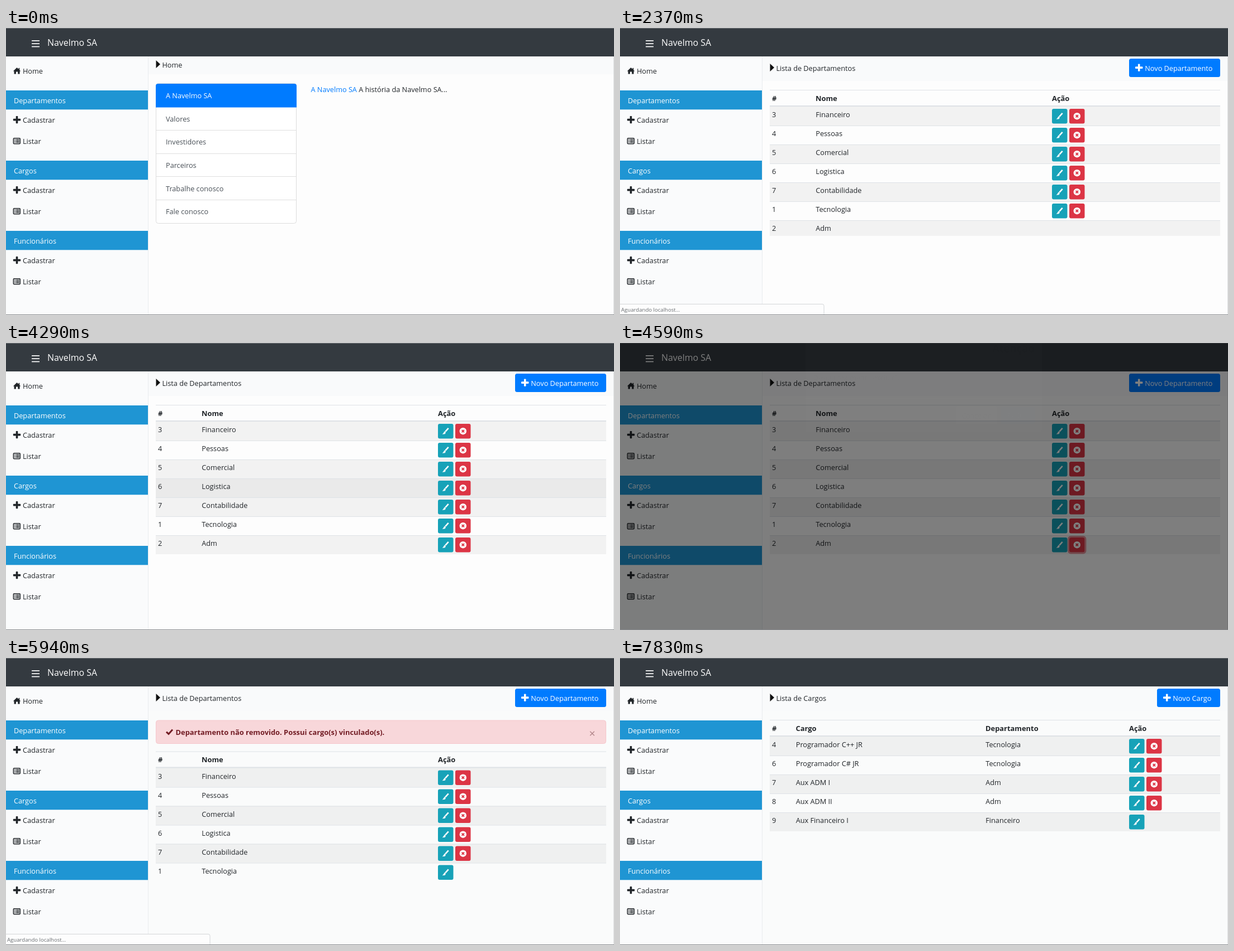
Recreate the animation shown at these times as an HTML page with a canvas. Size 1088 px wide and 515 px high, loop 8000 ms.

```html
<!DOCTYPE html>
<html lang="pt-BR">
<head>
<meta charset="utf-8">
<title>Navelmo SA</title>
<style>
  html, body { margin: 0; width: 100%; height: 100%; overflow: hidden; background: #fdfdfd; }
  canvas { display: block; width: 1088px; height: 515px; }
</style>
</head>
<body>
<canvas id="stage" width="1088" height="515"></canvas>
<script>
const ctx = document.getElementById('stage').getContext('2d');
const LOOP = 8000;
const SANS = '"Open Sans", "Noto Sans", sans-serif';
const INK = '#212529', BLUE = '#007bff', TEAL = '#17a2b8', RED = '#dc3545';
const LINE = '#dee2e6', HOVER = '#0056b3';

const TABS = [
  ['A Navelmo SA', 'A história da Navelmo SA...'],
  ['Valores', 'Nossos valores...'],
  ['Investidores', 'Informações para os investidores...'],
  ['Parceiros', 'Principais parceiros...'],
  ['Trabalhe conosco', 'Veja nossas vagas e envie o currículo...'],
  ['Fale conosco', 'Entre em contato...']
];
const DEPTS = [[3, 'Financeiro'], [4, 'Pessoas'], [5, 'Comercial'], [6, 'Logistica'],
  [7, 'Contabilidade'], [1, 'Tecnologia'], [2, 'Adm']];
const JOBS = [[4, 'Programador C++ JR', 'Tecnologia'], [6, 'Programador C# JR', 'Tecnologia'],
  [7, 'Aux ADM I', 'Adm'], [8, 'Aux ADM II', 'Adm'], [9, 'Aux Financeiro I', 'Financeiro']];

// Timelines: [start, value], the last one started is in force.
const HOST = 'localhost:8080/', WAIT = 'Aguardando localhost...';
const STATUS = [[0, ''], [270, HOST + '#valores'], [510, HOST + '#investidores'],
  [720, HOST + '#parceiros'], [960, HOST + '#hibernate'], [1350, HOST + 'departamentos/listar'],
  [1830, WAIT], [2925, ''], [5040, HOST + 'departamentos/excluir/2'], [5280, WAIT],
  [6780, HOST + 'cargos/listar'], [7020, WAIT], [7815, '']];
const TAB = [[0, 0], [420, 1], [630, 2], [840, 3], [1110, 4]];
const TAB_HOVER = [[0, -1], [270, 1], [510, 2], [720, 3], [960, 4], [1260, -1]];
const TAB_PRESS = [[0, -1], [360, 1], [420, -1], [570, 2], [630, -1], [780, 3], [840, -1], [1020, 4], [1110, -1]];
const SIDE_HOVER = [[0, ''], [1350, '0L'], [1500, '0C'], [1530, '0L'], [2370, ''], [2670, '0L'],
  [2730, '0C'], [3510, ''], [6540, '1C'], [6690, '1L'], [7740, '']];
const ROW_HOVER = [[0, -1], [3510, 3], [4320, 5], [4350, 6], [4440, -1], [6480, 0], [6540, -1]];

const entry = (list, t) => list.filter(e => e[0] <= t).pop();
const at = (list, t) => entry(list, t)[1];
const ramp = (t, start, len) => Math.min(1, Math.max(0, (t - start) / len));

function easeOut(x) {
  // cubic-bezier(0, 0, .58, 1)
  let lo = 0, hi = 1;
  for (let i = 0; i < 20; i++) {
    const s = (lo + hi) / 2;
    if (3 * .58 * (1 - s) * s * s + s * s * s < x) lo = s; else hi = s;
  }
  return lo * lo * (3 - 2 * lo);
}

function rect(x, y, w, h, color) {
  ctx.fillStyle = color;
  ctx.fillRect(x, y, w, h);
}
function box(x, y, w, h, r, fill, stroke, lw = 1) {
  ctx.beginPath();
  ctx.roundRect(x, y, w, h, r);
  if (fill) { ctx.fillStyle = fill; ctx.fill(); }
  if (stroke) { ctx.strokeStyle = stroke; ctx.lineWidth = lw; ctx.stroke(); }
}
function text(s, x, y, color = INK, size = 12.7, weight = 400) {
  ctx.font = `${weight} ${size}px ${SANS}`;
  ctx.fillStyle = color;
  ctx.fillText(s, x, y);
  return ctx.measureText(s).width;
}
function poly(points, color) {
  ctx.beginPath();
  for (let i = 0; i < points.length; i += 2) ctx.lineTo(points[i], points[i + 1]);
  ctx.closePath();
  ctx.fillStyle = color;
  ctx.fill();
}
function stroke(points, color, lw) {
  ctx.beginPath();
  for (let i = 0; i < points.length; i += 2) ctx.lineTo(points[i], points[i + 1]);
  ctx.strokeStyle = color;
  ctx.lineWidth = lw;
  ctx.stroke();
}
function cross(x, y, r, color, lw) {
  stroke([x - r, y - r, x + r, y + r], color, lw);
  stroke([x + r, y - r, x - r, y + r], color, lw);
}
function plus(x, y, color) {
  box(x, y + 4.8, 13.4, 3.6, 1, color);
  box(x + 4.9, y, 3.6, 13.2, 1, color);
}
function listIcon(x, y, color) {
  box(x + .8, y + .8, 11.8, 10, 1.2, null, color, 1.6);
  for (const dy of [2.6, 5, 7.4]) {
    rect(x + 2.8, y + dy, 1.7, 1.5, color);
    rect(x + 5.4, y + dy, 5.6, 1.5, color);
  }
}
function home() {
  poly([12.8, 77.4, 19.5, 71, 22.6, 73.8, 22.6, 71.8, 24.3, 71.8, 24.3, 75.4, 26.3, 77.4, 24.6, 77.6,
    24.6, 82.6, 21.2, 82.6, 21.2, 78.6, 17.9, 78.6, 17.9, 82.6, 14.5, 82.6, 14.5, 77.6], INK);
}

function sidebar(t) {
  rect(0, 51, 254, 464, '#fafbfc');
  rect(254, 51, 1, 464, '#e9ecef');
  home();
  text('Home', 30, 81.5);
  const hover = at(SIDE_HOVER, t);
  ['Departamentos', 'Cargos', 'Funcionários'].forEach((name, i) => {
    const y = 112 + 126 * i;
    rect(0, y, 254, 34.3, '#1f95d3');
    text(name, 14, y + 22.5, '#fff');
    const add = hover === i + 'C' ? HOVER : INK;
    const list = hover === i + 'L' ? HOVER : INK;
    plus(12.8, y + 46, add);
    text('Cadastrar', 30, y + 58, add);
    listIcon(12.6, y + 85, list);
    text('Listar', 30, y + 95.5, list);
  });
}

function header() {
  rect(0, 0, 1088, 51, '#343a40');
  rect(0, 0, 1088, 1, '#6b7075');
  for (const y of [22, 27.3, 32.6]) rect(46, y, 14, 1.7, '#fff');
  text('Navelmo SA', 74, 31.5, '#fff', 15.9);
}

function crumb(title, height, mid) {
  rect(255, 51, 833, height, '#f9fafb');
  poly([268.5, mid - 8, 276, mid - 1, 268.5, mid + 6], '#111');
  text(title, 279.5, mid + 4.5);
}

function homePage(t) {
  crumb('Home', 32, 66);
  const [since, active] = entry(TAB, t);
  const hover = at(TAB_HOVER, t), press = at(TAB_PRESS, t), pitch = 41.67;
  box(268.5, 100, 251, 250.5, 4, '#fff');
  TABS.forEach(([name], i) => {
    const y = 100 + pitch * i, on = i === active;
    const fill = i === press ? '#e9ecef' : i === hover || (i === 0 && t >= 270) ? '#f8f9fa' : '';
    if (fill) rect(268.5, y, 251, pitch, fill);
    if (i && !on) rect(268, Math.round(y - .4), 252, 1, '#dfdfdf');
    if (!on) text(name, 286, y + 26, i === press ? INK : '#495057');
  });
  box(268.5, 99.5, 251, 251, 4, null, '#dcdcdc');
  const top = Math.round(99.6 + pitch * active);
  box(268, top, 252, 42.5, active ? 0 : [4, 4, 0, 0], BLUE);
  text(TABS[active][0], 286, 126 + pitch * active, '#fff');

  ctx.globalAlpha = active ? ramp(t, since - 20, 150) : 1;
  const w = text(TABS[active][0] + ' ', 545.5, 115, BLUE);
  text(TABS[active][1], 545.5 + w, 115);
  ctx.globalAlpha = 1;
}

function newButton(x, label) {
  box(x, 55, 1074 - x, 33, 3.5, BLUE);
  plus(x + 11, 64.5, '#fff');
  text(label, x + 28.3, 76.5, '#fff');
}
function editButton(x, y, color = TEAL) {
  box(x, y, 27.5, 26.5, 3, color);
  stroke([x + 18.7, y + 7.8, x + 13.2, y + 14], '#fff', 2.6);
  poly([x + 11.8, y + 13.2, x + 14, y + 15.4, x + 12.6, y + 18.2, x + 7.6, y + 18.8, x + 9.4, y + 17], '#fff');
}
function deleteButton(x, y, focus, color = RED) {
  if (focus) box(x - 1.4, y - 1.4, 30.3, 29.3, 4, null, 'rgba(220,53,69,.5)', 3);
  box(x, y, 27.5, 26.5, 3, color);
  ctx.beginPath();
  ctx.arc(x + 13.8, y + 13.2, 6.2, 0, 7);
  ctx.fillStyle = '#fff';
  ctx.fill();
  cross(x + 13.8, y + 13.2, 2.2, color, 1.8);
}

// Columns hold the x of each heading; the last one is the action column.
function table(y, cols, heads, rows, opt) {
  rect(268, y, 806, 1, LINE);
  heads.forEach((h, i) => text(h, cols[i], y + 19.7, INK, 12.9, 700));
  rect(268, y + 28, 806, 2, LINE);
  const ax = cols[cols.length - 1];
  rows.forEach((row, i) => {
    const ry = y + 30 + 34 * i;
    const last = i === rows.length - 1;
    const parts = last ? opt.lastParts : 2;
    const h = parts ? 34 : 28;
    if (i % 2 === 0) rect(268, ry, 806, h, 'rgba(0,0,0,.045)');
    if (i === opt.hover) rect(268, ry, 806, h, 'rgba(0,0,0,.075)');
    if (i) rect(268, ry, 806, 1, LINE);
    row.forEach((s, c) => text(String(s), cols[c] + (c ? .3 : 0), ry + 19));
    if (parts > 0) editButton(ax, ry + 4);
    if (parts > 1) deleteButton(ax + 31, ry + 4, i === opt.focus, i === opt.dark ? '#c82333' : RED);
  });
}

function alertBox() {
  box(268.5, 112, 805, 41.5, 4, '#f8d7da', '#f5c6cb');
  stroke([287, 132.6, 291, 136.4, 298, 128.6], '#721c24', 3);
  text('Departamento não removido. Possui cargo(s) vinculado(s).', 303.5, 137.8, '#721c24', 12.9, 700);
  cross(1049, 135.5, 3.8, '#b58a8e', 1.6);
}

function deptPage(t) {
  crumb('Lista de Departamentos', 44, 72);
  newButton(911, 'Novo Departamento');
  const removed = t >= 5940;
  if (removed) alertBox();
  const early = removed ? t < 5970 : t < 2460;
  const rows = removed && early ? DEPTS.slice(0, 6) : DEPTS;
  table(removed ? 167.5 : 111, [272, 350, 773], ['#', 'Nome', 'Ação'], rows, {
    hover: at(ROW_HOVER, t),
    focus: !removed && t >= 4410 ? 6 : -1,
    dark: t >= 3660 && t < 3810 ? 3 : t >= 4380 && t < 4440 ? 6 : -1,
    lastParts: early ? (removed ? 1 : 0) : 2
  });
}

function jobPage() {
  crumb('Lista de Cargos', 44, 72);
  newButton(961, 'Novo Cargo');
  table(111, [272, 314.5, 654, 911], ['#', 'Cargo', 'Departamento', 'Ação'], JOBS, { lastParts: 1 });
}

function modal(t) {
  rect(0, 0, 1088, 515, `rgba(0,0,0,${.5 * ramp(t, 4440, 150)})`);
  if (t < 4590) return;
  const y = -21 + 45 * easeOut(ramp(t, 4590, 300));
  ctx.globalAlpha = ramp(t, 4590, 123);
  box(332, y, 423, 180.5, 4, '#fbfcfc');
  ctx.textAlign = 'right';
  text('Atenção', 742, y + 37.5, INK, 19.2, 600);
  ctx.textAlign = 'left';
  rect(332, y + 58, 423, 1, '#eef0f2');
  text('Deseja realmente excluir?...', 345.5, y + 88, '#2b2f33');
  rect(332, y + 120, 423, 1, '#eef0f2');
  box(600.5, y + 135, 74, 32, 3.5, '#dcdddd');
  text('Cancelar', 611.5, y + 156, INK);
  if (t >= 5220) box(679.8, y + 133.5, 63.5, 35, 4.5, null, 'rgba(0,123,255,.5)', 3);
  const k = ramp(t, 5040, 150);
  box(681.5, y + 135, 60.5, 32, 3.5, `rgb(0,${123 - 18 * k},${255 - 38 * k})`);
  text('Excluir', 692, y + 156, '#fff', 12.4, 600);
  ctx.globalAlpha = 1;
}

function statusBar(s) {
  if (!s) return;
  box(-2, 495.5, 367, 22, [0, 3, 0, 0], '#fdfdfd', '#d4d6d8');
  text(s, 2, 508.8, '#6a6e72', 9.6);
}

function draw(t) {
  rect(0, 0, 1088, 515, t < 5940 ? '#fdfdfd' : '#fafbfb');
  header();
  sidebar(t);
  if (t < 2370) homePage(t);
  else if (t < 7740) deptPage(t);
  else jobPage();
  rect(1087, 51, 1, 464, '#dcdee0');
  if (t >= 4440 && t < 5940) modal(t);
  statusBar(at(STATUS, t));
  rect(0, 514, 1088, 1, '#85888b');
}

const start = performance.now();
function tick() {
  draw((performance.now() - start) % LOOP);
  requestAnimationFrame(tick);
}
tick();
</script>
</body>
</html>
```
